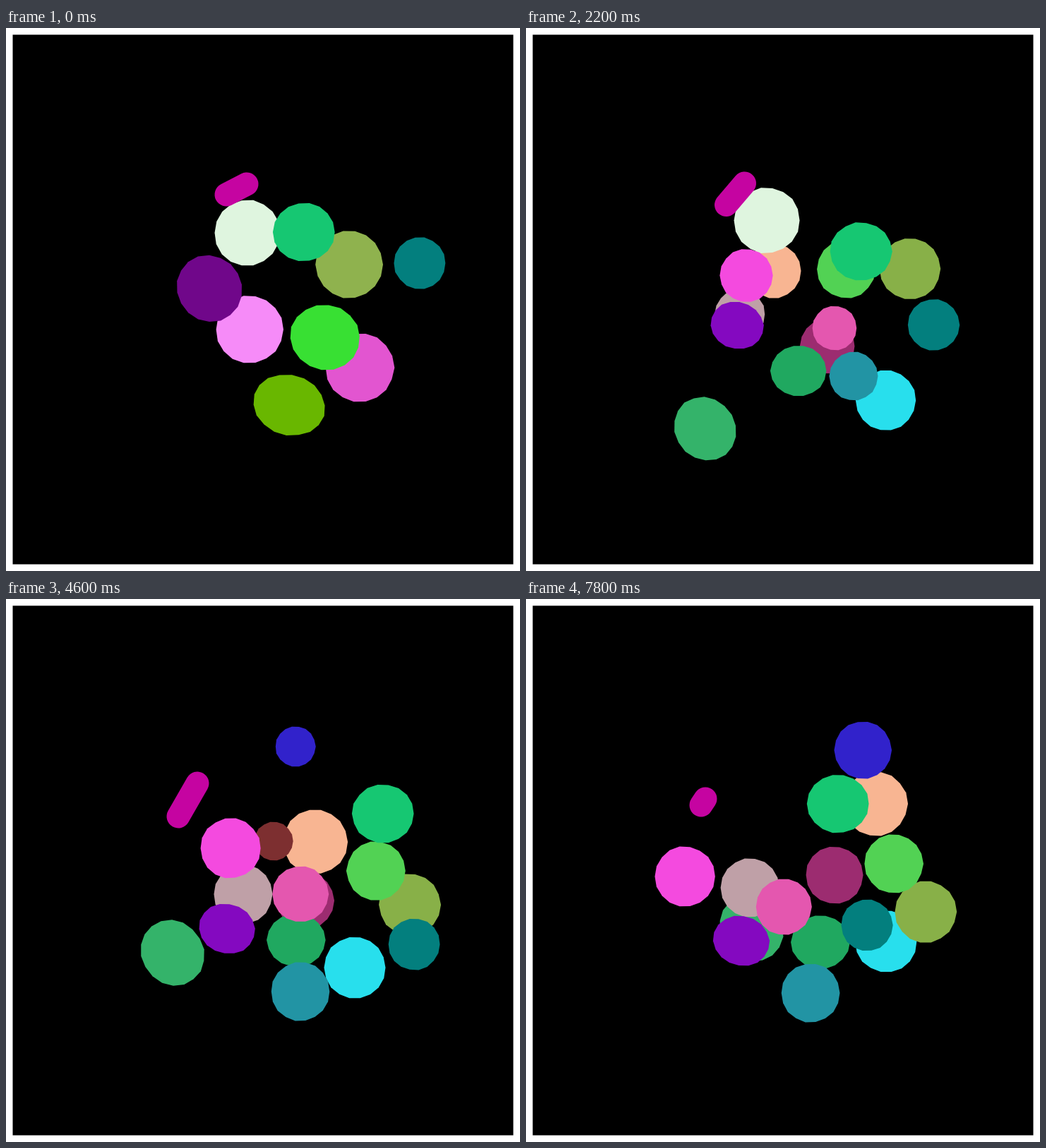
Animation, 728 px wide and 769 px high, one loop 8 s. Source, as an HTML page with a canvas:

```html
<!DOCTYPE html>
<html lang="en">
<head>
<meta charset="utf-8">
<title>Dividing cells</title>
<style>
  html, body { margin: 0; width: 100%; height: 100%; overflow: hidden; background: #fff; }
  canvas { display: block; }
</style>
</head>
<body>
<canvas id="stage" width="728" height="769"></canvas>
<script>
const ctx = document.getElementById('stage').getContext('2d');
const STEP_MS = 200;
const STEPS = 40;
const KEY_STEPS = [0, 7, 15, 23, 27, 34, 39];
const GROWTH_STEPS = 8;
const CORNERS = 18;
const cells = [];

const mix = (a, b, part) => a + (b - a) * part;
const mixPoint = (a, b, part) => [mix(a[0], b[0], part), mix(a[1], b[1], part)];
const noise = seed => Math.abs(Math.sin(seed * 12.9898) * 43758.5453) % 1;

// Path points fall on consecutive key steps, starting where the parent's path stops.
// A parent divides halfway between its last key step and the next one.
function cell(color, { parent, radius, newborn = radius, oval = 1, tilt = 0 }, ...points) {
  const firstKey = parent ? parent.endKey : 0;
  const endKey = firstKey + points.length;
  const path = points.map((point, i) => ({ step: KEY_STEPS[firstKey + i], point }));
  if (parent) {
    path.unshift({ step: parent.death, point: mixPoint(parent.path.at(-1).point, points[0], 0.5) });
  }
  const death = endKey < KEY_STEPS.length
    ? Math.ceil((KEY_STEPS[endKey - 1] + KEY_STEPS[endKey]) / 2) : STEPS;
  const made = { color, radius, newborn, oval, tilt, path, endKey, death, birth: path[0].step };
  cells.push(made);
  return made;
}

// Declared from the bottom layer to the top one.
const orchid = cell('#e255d0', { radius: 48 }, [501, 481]);
const lime = cell('#69b700', { radius: 46, oval: 1.1, tilt: 0.3 }, [401, 534]);
const pink = cell('#f68bf8', { radius: 47 }, [345, 427], [316, 371]);
cell('#9c2c70', { parent: orchid, radius: 40, newborn: 26 },
  [424, 431], [430, 470], [424, 427], [426, 418], [421, 397], [437, 391]);
cell('#f8b592', { parent: pink, radius: 45, newborn: 38 },
  [386, 317], [438, 344], [440, 313], [470, 301], [495, 290]);
cell('#34b36a', { parent: lime, radius: 45, newborn: 35, oval: 1.05, tilt: 0.9 },
  [262, 575], [245, 560], [236, 501], [262, 520], [298, 505], [319, 467]);
cell('#28dfed', { parent: orchid, radius: 43, newborn: 35 },
  [501, 551], [518, 504], [494, 522], [500, 493], [505, 483], [510, 485]);
cell('#20a860', { parent: lime, radius: 39, newborn: 24, oval: 1.05 },
  [381, 489], [391, 482], [411, 483], [418, 487], [427, 486], [417, 486]);
const bright = cell('#38e033', { radius: 47, oval: 1.04, tilt: 0.3 }, [452, 438], [473, 466]);
const purple = cell('#70078a', { radius: 46, oval: 1.03, tilt: 0.9 }, [288, 369], [271, 391]);
cell('#2294a4', { parent: bright, radius: 41, newborn: 34 },
  [455, 520], [417, 556], [414, 556], [419, 557], [403, 558]);
cell('#bfa0a7', { parent: purple, radius: 41, newborn: 35 },
  [335, 420], [336, 418], [321, 432], [306, 429], [317, 409]);
cell('#8409c0', { parent: purple, radius: 37, newborn: 35, oval: 1.07, tilt: 0.3 },
  [327, 451], [313, 467], [304, 489], [310, 501], [305, 484]);
cell('#e457af', { parent: bright, radius: 39, newborn: 31 },
  [401, 384], [417, 418], [383, 432], [367, 443], [365, 436]);
const khaki = cell('#8fb24e', { radius: 47 }, [486, 335]);
cell('#88b048', { parent: khaki, radius: 43, newborn: 39 },
  [500, 309], [588, 373], [572, 433], [569, 424], [564, 423], [566, 443]);
cell('#52d254', { parent: khaki, radius: 41, newborn: 38 },
  [417, 325], [490, 358], [524, 385], [527, 376], [521, 364], [521, 375]);
const mint = cell('#dff5df', { radius: 46 }, [342, 290], [324, 258], [358, 287]);
cell('#7d2f30', { parent: mint, radius: 36, newborn: 18 },
  [379, 343], [402, 334], [409, 304], [438, 293]);
cell('#16c772', { radius: 42, oval: 1.03 },
  [422, 289], [420, 320], [529, 313], [534, 304], [490, 302], [447, 292], [442, 290]);
cell('#037f7e', { radius: 36 },
  [586, 333], [589, 380], [566, 461], [578, 489], [556, 451], [533, 459], [483, 462]);
cell('#f44adf', { parent: pink, radius: 42, newborn: 37 },
  [308, 330], [318, 353], [275, 366], [235, 395], [225, 393]);
cell('#3122cb', { parent: mint, radius: 40, newborn: 16 },
  [410, 209], [485, 228], [458, 211], [477, 214]);

// The bean-shaped cell is a thick stroke between two moving ends.
const keyed = points => points.map((point, i) => ({ step: KEY_STEPS[i], point }));
const bean = {
  color: '#c504a1',
  width: 33,
  head: keyed([[341, 221], [335, 226], [284, 214], [271, 261], [244, 291], [253, 288], [254, 283]]),
  tail: keyed([[312, 236], [308, 241], [259, 260], [244, 308], [236, 311], [253, 340], [248, 292]]),
};

function pointAt(path, step) {
  const next = path.findIndex(key => key.step >= step);
  if (next < 0) return path.at(-1).point;
  if (next === 0) return path[0].point;
  const from = path[next - 1];
  const to = path[next];
  return mixPoint(from.point, to.point, (step - from.step) / (to.step - from.step));
}

function drawCell({ color, radius, newborn, oval, tilt, path, birth }, step, id) {
  const [x, y] = pointAt(path, step);
  const size = mix(newborn, radius, Math.min((step - birth) / GROWTH_STEPS, 1));
  ctx.save();
  ctx.translate(x, y);
  ctx.rotate(tilt);
  ctx.scale(oval, 1 / oval);
  ctx.beginPath();
  for (let i = 0; i < CORNERS; i++) {
    const angle = i / CORNERS * Math.PI * 2;
    const reach = size * (1.005 + 0.025 * noise(id * 97 + step * 31 + i + 1));
    ctx.lineTo(reach * Math.cos(angle), reach * Math.sin(angle));
  }
  ctx.fillStyle = color;
  ctx.fill();
  ctx.restore();
}

function drawBean({ color, width, head, tail }, step) {
  ctx.strokeStyle = color;
  ctx.lineWidth = width;
  ctx.lineCap = 'round';
  ctx.beginPath();
  ctx.moveTo(...pointAt(head, step));
  ctx.lineTo(...pointAt(tail, step));
  ctx.stroke();
}

function draw() {
  const step = Math.floor(performance.now() / STEP_MS) % STEPS;
  ctx.fillStyle = '#fff';
  ctx.fillRect(0, 0, 728, 769);
  ctx.fillStyle = '#000';
  ctx.fillRect(9.5, 9.5, 709, 750);
  cells.forEach((item, id) => {
    if (step >= item.birth && step < item.death) drawCell(item, step, id);
  });
  drawBean(bean, step);
  requestAnimationFrame(draw);
}
draw();
</script>
</body>
</html>
```
